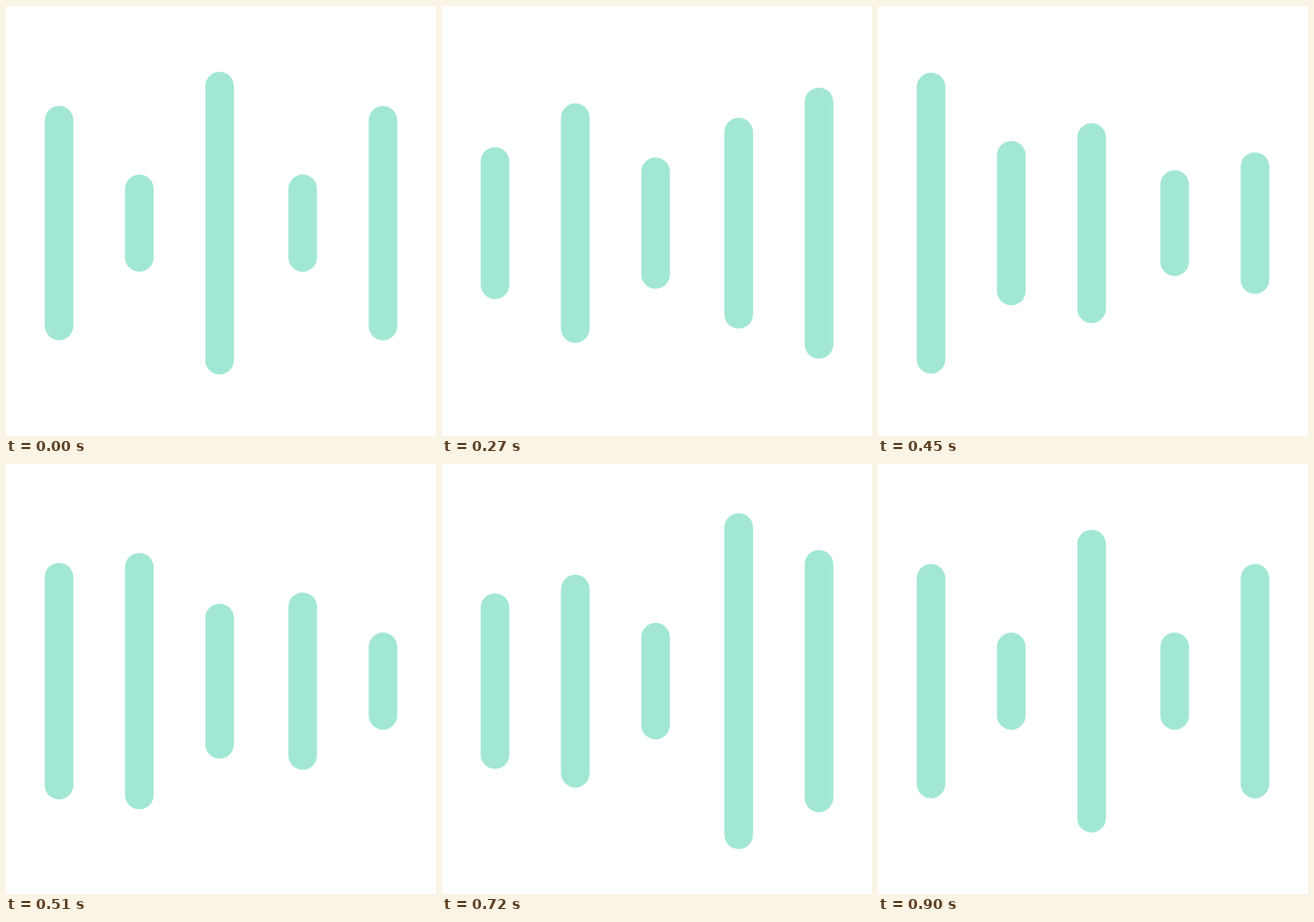
An HTML page for the animation above (0.93 s loop, 500 by 500 pixels).

```html
<!DOCTYPE html>
<html lang="en">
<head>
<meta charset="utf-8">
<title>Sound bars</title>
<style>
  html, body { margin: 0; width: 100%; height: 100%; overflow: hidden; background: #fff; }
  svg { display: block; width: 100vw; height: 100vh; }
</style>
</head>
<body>
<svg id="stage" viewBox="0 0 500 500" fill="#a2e7d5"></svg>
<script>
const STEP = 30, STEPS = 31, LAST = STEPS - 1;
const UNIT = 10 / 3, WIDTH = 10 * UNIT, MID = 252.5;

// Each bar swings through these levels, turning at these steps, then returns to its first level.
const swings = [
  { levels: [2, 0.05, 3, 0.7], turns: [6, 14.6, 19.9] },
  { levels: [0, 3, 0, 2.88], turns: [7, 12.2, 19.1] },
  { levels: [3, 0.33, 2, -0.12], turns: [8.3, 11.45, 22] },
  { levels: [0, 2, 0, 4], turns: [7, 14, 22] },
  { levels: [2, 1, 3, 0, 2.53], turns: [5, 11, 16.9, 25.3] }
];

const leftOf = i => (13.5 + Math.round(28.2 * i)) * UNIT;
const heightOf = level => 112.9 + 79.7 * level;

const stage = document.getElementById("stage");

function addBar({ levels, turns }, i) {
  const bar = document.createElementNS(stage.namespaceURI, "rect");
  bar.setAttribute("x", leftOf(i));
  bar.setAttribute("width", WIDTH);
  bar.setAttribute("rx", WIDTH / 2);
  stage.append(bar);

  const steps = [0, ...turns, LAST];
  const frames = [...levels, levels[0]].map((level, k) => {
    const h = heightOf(level);
    return { offset: steps[k] / LAST, y: `${MID - h / 2}px`, height: `${h}px`, easing: "ease-in-out" };
  });
  const motion = bar.animate(frames, { duration: LAST * STEP, fill: "both" });
  motion.pause();
  return motion;
}

const motions = swings.map(addBar);
const start = performance.now();

function tick() {
  const step = Math.floor((performance.now() - start) / STEP) % STEPS;
  for (const motion of motions) motion.currentTime = step * STEP;
  requestAnimationFrame(tick);
}
tick();
</script>
</body>
</html>
```
